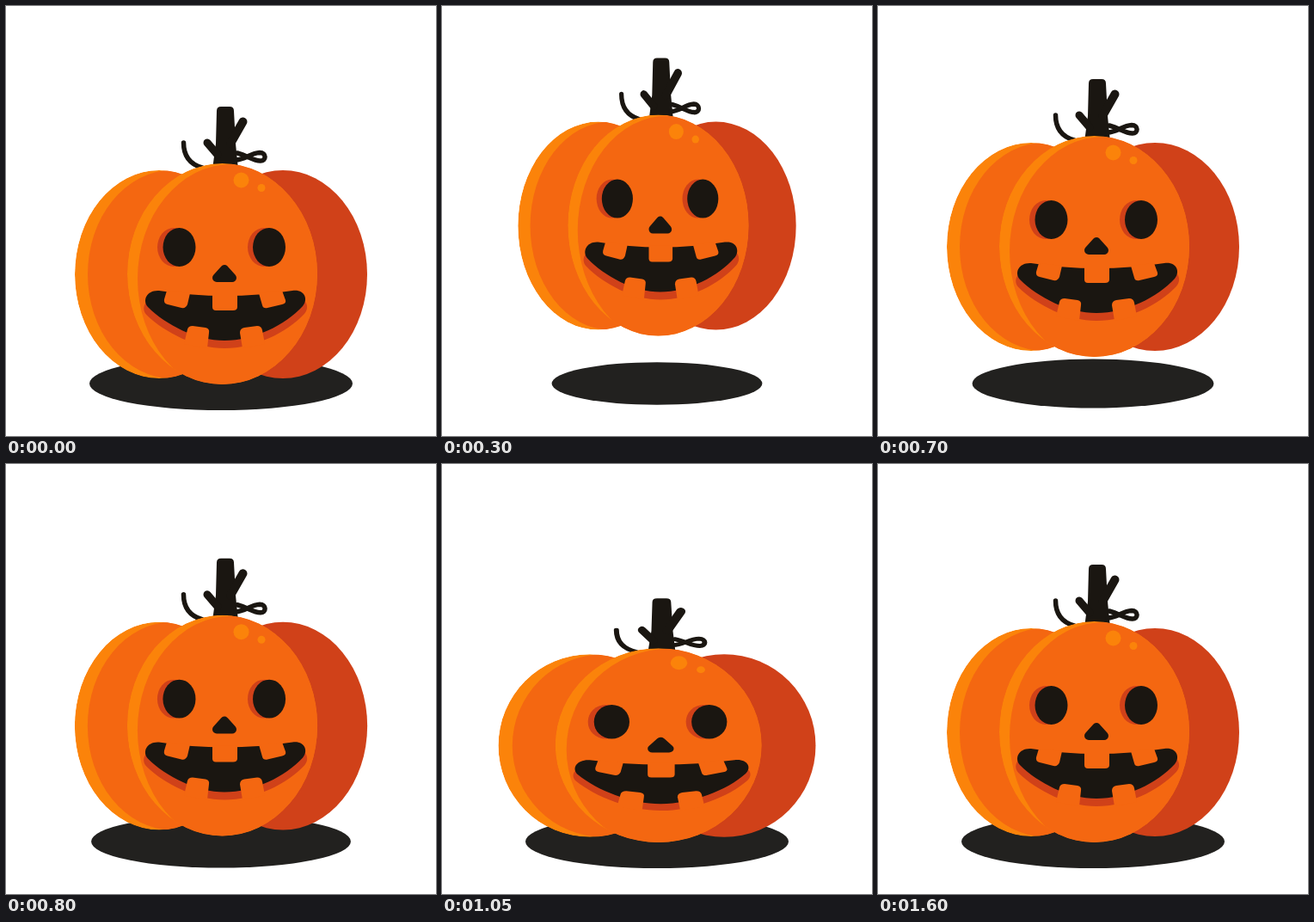
Recreate the animation shown at these times as an HTML page. Size 500 px wide and 500 px high, loop 2050 ms.

```html
<!DOCTYPE html>
<html lang="en">
<head>
<meta charset="utf-8">
<title>Bouncing pumpkin</title>
<style>
  html, body { margin: 0; width: 100%; height: 100%; overflow: hidden; background: #fff; }
  svg { display: block; width: 100%; height: 100%; }
  .ink { fill: #1a1611; }
  .line { fill: none; stroke: #1a1611; stroke-linecap: round; }
  .flesh { fill: #f46711; }
  .light { fill: #fb830a; }
  .shade { fill: #d04119; }
</style>
</head>
<body>
<svg viewBox="0 0 500 500">
  <defs>
    <clipPath id="sideClip"><ellipse cx="178" cy="312" rx="98" ry="121"/></clipPath>
    <clipPath id="frontClip"><ellipse cx="251.5" cy="311.5" rx="110.5" ry="128.5"/></clipPath>
    <path id="grin" d="M178 331Q254 343 333 331C347 329 352 341 345 349C325 371 288 389 254 389C222 389 186 371 165 350C158 342 164 330 178 331Z"/>
  </defs>

  <ellipse id="shadow" cx="250" cy="439" rx="153" ry="31" fill="#22211f"/>

  <g id="pumpkin">
    <g id="stem">
      <path class="ink" d="M250 117H260Q265 117 265 122L267 160L270 190H240L244 160L245 122Q245 117 250 117Z"/>
      <path class="line" stroke-width="10" d="M261 160L275.5 134.500"/>
      <path class="line" stroke-width="9" d="M246 173L234 159"/>
      <path class="line" stroke-width="5.5" d="M206.500 159C206.500 174 214 184 228 188"/>
      <path class="line" stroke-width="5.5" d="M267 179C278 179 284 171 295 170.500C303 170.500 303 180.500 295.500 180C287 180 281 174 269 171"/>
    </g>

    <ellipse class="shade" cx="322" cy="312" rx="98" ry="121"/>
    <g clip-path="url(#sideClip)">
      <ellipse class="light" cx="178" cy="312" rx="98" ry="121"/>
      <ellipse class="flesh" cx="193" cy="312" rx="98" ry="121"/>
    </g>
    <g clip-path="url(#frontClip)">
      <ellipse class="light" cx="251.5" cy="311.5" rx="110.5" ry="128.5"/>
      <ellipse class="flesh" cx="262" cy="317" rx="109" ry="133"/>
    </g>
    <circle class="light" cx="273.5" cy="202.5" r="9"/>
    <circle class="light" cx="297" cy="211.5" r="4.5"/>

    <g id="eyes">
      <ellipse class="shade" cx="195" cy="280.5" rx="19" ry="22.5"/>
      <ellipse class="ink" cx="201.5" cy="280.5" rx="19" ry="22.5"/>
      <ellipse class="shade" cx="300" cy="280.5" rx="19" ry="22.5"/>
      <ellipse class="ink" cx="306" cy="280.5" rx="19" ry="22.5"/>
    </g>
    <path class="ink" stroke="#1a1611" stroke-width="10" stroke-linejoin="round" d="M254 306L263 316H245Z"/>

    <use href="#grin" class="shade" transform="translate(-5 9) scale(1.02 1)"/>
    <use href="#grin" class="ink"/>
    <g id="teeth" class="flesh">
      <path d="M187 331L214 334L211 347Q209 352 204 351L188 347Q183 346 184 341Z"/>
      <path d="M240 335H269V350Q269 354 264 354H244Q240 354 240 350Z"/>
      <path d="M294 334L321 331L325 342Q326 346 321 347L304 351Q299 352 298 348Z"/>
      <path d="M211 376Q212 372 217 372L232 374Q237 375 236 380L234 398L207 393Z"/>
      <path d="M272 380Q272 375 277 374L292 372Q297 372 298 377L301 393L275 398Z"/>
    </g>
  </g>
</svg>
<script>
  const LOOP = 2050, STEP = 50, GROUND = 440;
  const pumpkin = document.getElementById('pumpkin');
  const shadow = document.getElementById('shadow');

  // Smooth 0..1 ramp between two times
  function ramp(t, from, to, power = 1) {
    const x = Math.min(1, Math.max(0, (t - from) / (to - from))) ** power;
    return x * x * (3 - 2 * x);
  }

  // The motion runs in steps, settles at 1150 and rests from 1600
  function poseTime(ms) {
    const t = Math.floor(ms / STEP) * STEP;
    return t >= 1600 ? 0 : Math.min(t, 1150);
  }

  function draw(now) {
    const t = poseTime(now % LOOP);
    const lift = 64 * (ramp(t, 0, 420, 0.72) - ramp(t, 525, 875));
    const narrow = t < 550 ? 0.05 * Math.sin(Math.PI * t / 550) ** 2 : 0;
    const squash = t > 700 ? Math.exp(-(((t - 1000) / 90) ** 2)) : 0;
    const sx = 1 - narrow + 0.116 * squash;
    const sy = 1 - 0.165 * squash;
    pumpkin.setAttribute('transform',
      `translate(250 ${GROUND - lift}) scale(${sx} ${sy}) translate(-250 ${-GROUND})`);

    const size = 1 - 0.2 * (ramp(t, 0, 245) - ramp(t, 500, 857));
    shadow.setAttribute('rx', 153 * size);
    shadow.setAttribute('ry', 31 * size);
    requestAnimationFrame(draw);
  }
  requestAnimationFrame(draw);
</script>
</body>
</html>
```
